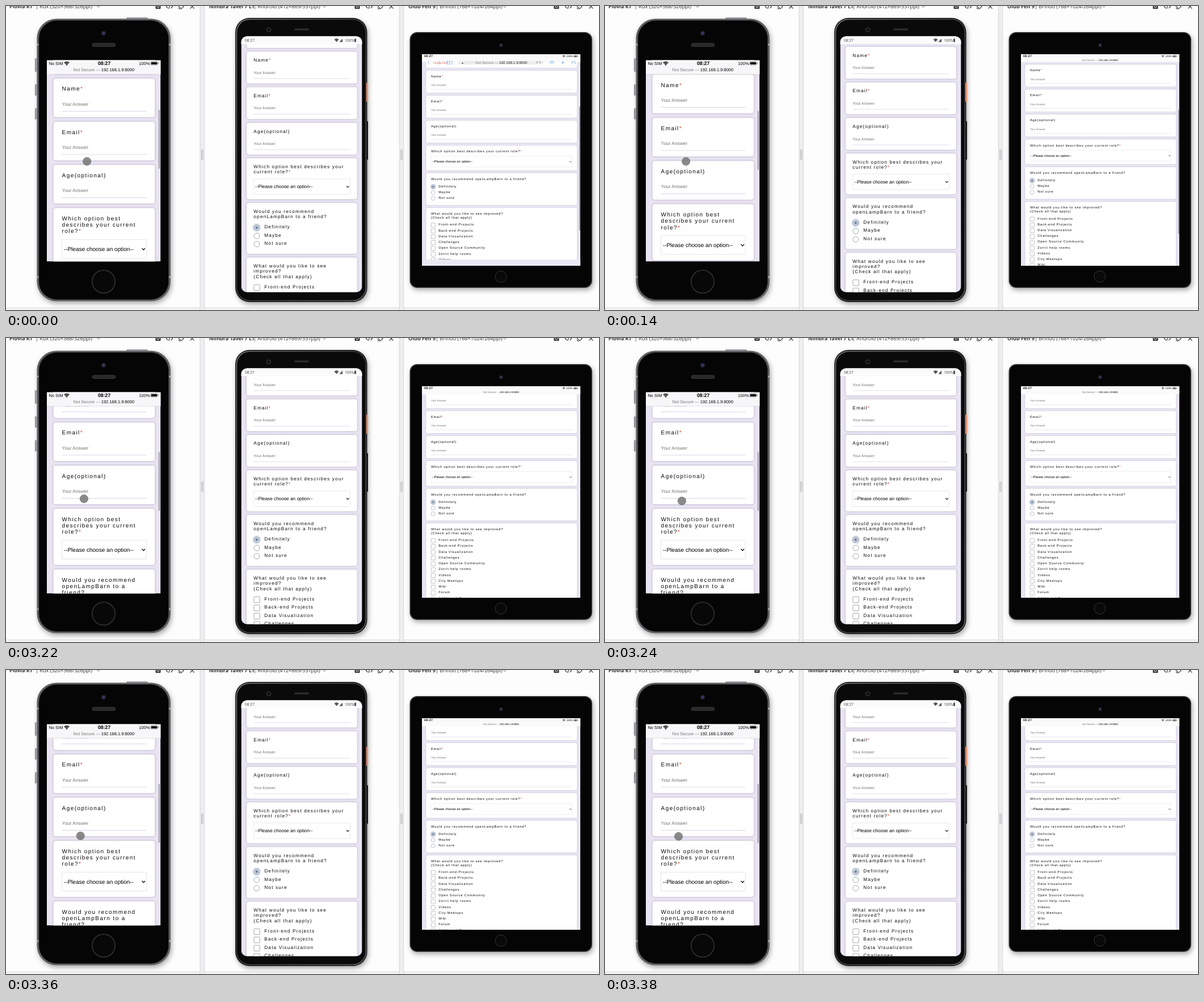
Write an HTML page that moves like this. It is 1045 px wide and 536 px high and loops after 8 s.

```html
<!DOCTYPE html>
<html lang="en">
<head>
<meta charset="utf-8">
<title>Form on three devices</title>
<style>
  html, body { margin: 0; width: 100%; height: 100%; overflow: hidden; background: #fdfdfd; }
  svg { display: block; width: 100vw; height: 100vh; font-family: "Liberation Sans", Arial, sans-serif; }
  text { white-space: pre; text-rendering: geometricPrecision; }
  .shadow { filter: drop-shadow(2px 4px 4px #0005); }
  .card { fill: #fff; stroke: #cfc9da; stroke-width: 1.3; filter: drop-shadow(0 0 2px #bdb5cc); }
  .label { font-size: 16px; letter-spacing: 2.25px; fill: #0a0a0a; }
  .hint { font-size: 13.33px; fill: #757575; }
  .line { stroke: #dcdcec; stroke-width: 1.8; }
  .box { fill: #fff; stroke: #858585; stroke-width: 1.4; }
  .ring { fill: #fff; stroke: #8795ab; stroke-width: 1.6; }
  .head { font: 9.1px "Open Sans", "Noto Sans", sans-serif; fill: #333; }
  .icon { fill: none; stroke: #444; stroke-width: 1.2; }
</style>
</head>
<body>
<svg id="stage" viewBox="0 0 1045 536" preserveAspectRatio="none"></svg>
<script>
const rect = (x, y, w, h, r, fill, more = '') =>
  `<rect x="${x}" y="${y}" width="${w}" height="${h}" rx="${r}" fill="${fill}" ${more}/>`;
const circle = (x, y, r, fill, more = '') =>
  `<circle cx="${x}" cy="${y}" r="${r}" fill="${fill}" ${more}/>`;
const path = (d, more = 'class="icon"') => `<path d="${d}" ${more}/>`;
const text = (x, y, size, str, more = '') =>
  `<text x="${x}" y="${y}" font-size="${size}" ${more}>${str}</text>`;

// Form pages are laid out in CSS pixels and scaled; y lists the scroll positions.
const devices = [
  { x: 72.5, s: .628, w: 320, y: [127.5, 120.6, 72.3], clip: [72, 95.5, 200.5, 355, 0],
    role: 'Which option best|describes your current|role?',
    rec: 'Would you recommend|openLampBarn to a|friend?',
    see: 'What would you like to|see improved?|(Check all that apply)' },
  { x: 414.9, s: .517, w: 412, y: [80.1, 71.6, 45], clip: [414.5, 53.5, 213, 451, 10],
    role: 'Which option best describes your|current role?',
    rec: 'Would you recommend|openLampBarn to a friend?',
    see: 'What would you like to see|improved?|(Check all that apply)' },
  { x: 733.8, s: .3633, w: 768, y: [113.5, 102.7, 84.3], clip: [733, 85, 279.2, 373, 0],
    role: 'Which option best describes your current role?',
    rec: 'Would you recommend openLampBarn to a friend?',
    see: 'What would you like to see improved?|(Check all that apply)' }
];
const topics = ['Front-end Projects', 'Back-end Projects', 'Data Visualization', 'Challenges',
  'Open Source Community', 'Zorrit help rooms', 'Videos', 'City Meetups', 'Wiki', 'Forum',
  'Additional Courses'];
const star = '<tspan fill="#d8432f">*</tspan>';

function form({ w, role, rec, see }) {
  const left = 41.5, right = w - left, gap = 11.2, step = 28.2;
  let y = 0, out = '';
  const card = (top, h) => rect(17, top, w - 34, h, 7, '#fff', 'class="card"');
  const title = (str, mark) => {
    const lines = str.split('|'), last = lines.length - 1;
    lines.forEach((s, i) => out +=
      text(left, y + 35 + 18 * i, 16, s + (mark && i === last ? star : ''), 'class="label"'));
  };
  const options = (list, base, mark) => list.forEach((s, i) => {
    const cy = y + base + i * step;
    out += mark(cy + 2.5, i) + text(78, cy + 5.5, 16, s, 'class="label"');
  });

  out += card(-200 - gap, 200);
  ['Name', 'Email', 'Age(optional)'].forEach((s, i) => {
    out += card(y, 110);
    title(s, i < 2);
    out += text(left, y + 76.8, 13.33, 'Your Answer', 'class="hint"') +
      path(`M${left} ${y + 92.5}H${right}`, 'class="line"');
    y += 110 + gap;
  });

  let n = 18 * role.split('|').length;
  out += card(y, n + 105);
  title(role, true);
  out += rect(left, y + n + 35, right - left, 53, 1, '#fff', 'stroke="#e4e4ee" stroke-width="1.6"') +
    text(46.5, y + n + 67, 16, '--Please choose an option--') +
    path(`M${w - 54} ${y + n + 59.5}l4.5 4.5l4.5 -4.5`, 'fill="none" stroke="#111" stroke-width="2.2"');
  y += n + 105 + gap;

  n = 18 * (rec.split('|').length - 1) + 64.5;
  out += card(y, n + 92.5);
  title(rec);
  options(['Definitely', 'Maybe', 'Not sure'], n, (cy, i) => i
    ? circle(52, cy, 9.5, '#fff', 'class="ring"')
    : circle(52, cy, 17, 'url(#glow)') +
      circle(52, cy, 9, '#c6cfdc', 'stroke="#9ca8ba" stroke-width="1.5"') + circle(52, cy, 4, '#6a7b98'));
  y += n + 92.5 + gap;

  n = 18 * (see.split('|').length - 1) + 64.2;
  out += card(y, n + topics.length * step + 10);
  title(see);
  options(topics, n, cy => rect(42.5, cy - 9.5, 20, 20, 2, '#fff', 'class="box"'));
  return out;
}

const screen = (d, i) => {
  const [x, y, w, h, r] = d.clip;
  return `<clipPath id="clip${i}">${rect(x, y, w, h, r, '#fff')}</clipPath>
    <g clip-path="url(#clip${i})">${rect(x, y, w, h, 0, '#e9e4f2')}<g id="page${i}">${form(d)}</g>`;
};

const arcs = (x, y, r, color) => circle(x, y - r * .1, r * .16, color) +
  [.45, .75, 1.05].map(k => path(`M${x - r * k * .72} ${y - r * k * .7}Q${x} ${y - r * k * 1.3} ${x + r * k * .72} ${y - r * k * .7}`,
    `fill="none" stroke="${color}" stroke-width="${r * .19}"`)).join('');
const battery = (x, y, w, h) => rect(x, y, w, h, h * .25, '#fff', 'stroke="#444" stroke-width=".6"') +
  rect(x + .9, y + .9, w - 1.8, h - 1.8, .6, '#111') + rect(x + w + .6, y + h * .3, .9, h * .4, .4, '#444');
const address = (x, y, size) => text(x, y, size,
  '<tspan fill="#777">Not Secure — </tspan>192.168.1.9:8000');

function header(x, name, x2, info, chevron, icons) {
  const [a, b, c, d] = icons;
  return text(x, 3.6, 9.1, name, 'class="head" style="font-weight:700"') +
    text(x2, 3.6, 9.1, info, 'class="head"') +
    path(`M${chevron - 2.5} 0l2.5 2.5l2.5 -2.5`, 'fill="none" stroke="#777"') +
    rect(a - 4.5, -3, 9, 8, 1, '#333') + circle(a, 1, 2, '#333', 'stroke="#fff" stroke-width=".9"') +
    path(`M${b - 2.5} -2l-3 3l3 3M${b + 2.5} -2l3 3l-3 3M${b + 1.2} -3l-2.4 8`) +
    path(`M${c - 4} 0l4 -4l5 5l-4 4zM${c - 4} 3l3 3`) +
    path(`M${d - 3.5} -2.5l7 7m0 -7l-7 7`);
}

function smallPhone() {
  const bands = [68, 478].map(y => rect(54.2, y - 1.5, 4, 3, 0, '#aaa') + rect(286.5, y - 1.5, 4, 3, 0, '#aaa'));
  const keys = [[92, 24], [138, 20], [180, 20]].map(([y, h]) => rect(51, y, 5, h, 1.5, 'url(#metal)'));
  return rect(212, 20, 38, 6, 2, '#a3a4a8') + keys.join('') +
    rect(54.5, 22.5, 235.5, 498, 34, '#5f6164', 'class="shadow"') + bands.join('') +
    rect(58, 25.5, 228.5, 492, 31.5, '#050505', 'stroke="#2c2d2f" stroke-width="1"') +
    circle(172, 48, 4.3, '#20222b') + circle(172, 48, 2, '#3b3f72') +
    rect(152, 65.8, 41, 5.6, 2.8, '#292929', 'stroke="#454545" stroke-width=".7"') +
    circle(172, 486, 20.3, '#080808', 'stroke="#343434" stroke-width="1.5"') +
    screen(devices[0], 0) +
    rect(72, 95.5, 201, 24.7, 0, '#f7f7f9') + path('M72 120.3H273', 'stroke="#d0cdd6" stroke-width=".6"') +
    text(75.4, 104, 7.5, 'No SIM') + arcs(107, 104.6, 6, '#111') +
    text(161.9, 104.4, 8.8, '08:27', 'font-weight="700"') + text(234.4, 104, 7.5, '100%') +
    battery(255, 98, 12, 6) + address(118.6, 115, 7.5) +
    rect(268.8, 0, 2.2, 104, 1.1, '#a5a0ae', 'id="bar0"') + '</g>';
}

function tallPhone() {
  return rect(404, 21, 232.5, 501, 25, '#1b1c1d', 'class="shadow"') +
    rect(406.4, 23.4, 227.7, 496.2, 23, '#0a0a0a', 'stroke="url(#rim)" stroke-width="1.5"') +
    rect(635, 135, 3, 34, 1, '#e58a6c') + rect(635, 203, 3, 68, 1, '#181818') +
    circle(463, 42, 4.5, '#252628') + circle(463, 42, 2.2, '#0b0b0c') +
    rect(508, 39.5, 26, 3.6, 1.8, '#2b2b2b') +
    screen(devices[1], 1) +
    rect(414, 53, 214, 14.2, 0, '#fbfbfc') +
    `<g fill="#555" font-family="Roboto, sans-serif">` + text(421, 63, 6.8, '08:27') + text(597, 63, 6.8, '100%') +
    path('M582.5 63.6l-4 -4.7q4 -3.4 8 0zM593 57.5v6h-5.5zM613.8 58h.9v-.8h1.4v.8h.9v5.6h-3.2z', '') + '</g></g>';
}

function tablet() {
  const blue = 'fill="none" stroke="#6aa5ea" stroke-width=".9"';
  const toolbar = `<g id="toolbar"><clipPath id="fold">${rect(733, 97, 280, 6, 0, '#fff')}</clipPath>
    <g clip-path="url(#fold)" opacity=".85">` +
    text(753, 102, 6, 'required', 'fill="#d8432f" letter-spacing=".5"') +
    rect(797, 89, 150, 14, 2, '#e9e9ec') + text(803, 102, 6, '▴', 'fill="#333"') + address(827, 102, 6.4) +
    path('M747 96l-4 4l4 4M761 96l4 4l-4 4M777 97h9v6h-9zM781.5 97v6M959 98h6v6h-6zM962 102v-6M978 100h6M981 97v6M997 98h6v6h-6z', blue) +
    path('M936 101a3 3 0 1 1 5 0', 'fill="none" stroke="#555" stroke-width=".8"') + '</g>' +
    rect(733, 447, 280, 12, 0, '#ebe7f3') + '</g>';
  return rect(711.5, 46, 321.5, 451, 13, '#3a3b3d', 'class="shadow"') +
    rect(713, 47.5, 318.5, 448, 12, '#050505') +
    circle(872.5, 69, 3.2, '#22242e') + circle(872.5, 69, 1.5, '#3b3f6a') +
    circle(872, 477, 10, '#090909', 'stroke="#343434"') +
    screen(devices[2], 2) +
    rect(733, 85, 280, 14, 0, '#fafafb') +
    text(737, 90, 5.2, '08:27', 'font-weight="700" letter-spacing=".4"') +
    arcs(983, 90.4, 3.2, '#111') + text(987.5, 90.2, 4.4, '100%') + battery(1000.5, 87, 6, 3.2) +
    `<g id="compact">${address(841, 96.8, 4.4)}</g>` + toolbar +
    rect(1010.3, 0, 1.2, 219, .6, '#77727f', 'id="bar2"') + '</g>';
}

const divider = x => rect(x, 0, 7.5, 536, 0, '#eeeef0') +
  path(`M${x} 0V536M${x + 7.5} 0V536`, 'stroke="#cfcfd2" stroke-width=".8"') +
  path(`M${x + 2.6} 253v18m2.3 0v-18`, 'stroke="#a9a9ad" stroke-width=".9"');

document.getElementById('stage').innerHTML = `<defs>
  <linearGradient id="rim" x2="1" y2="1"><stop stop-color="#77797c"/><stop offset=".5" stop-color="#3a3b3d"/><stop offset="1" stop-color="#606265"/></linearGradient>
  <linearGradient id="metal"><stop stop-color="#77797d"/><stop offset=".5" stop-color="#c4c5c8"/><stop offset="1" stop-color="#77797d"/></linearGradient>
  <radialGradient id="glow"><stop offset=".45" stop-color="#a3b1c8"/><stop offset="1" stop-color="#d0d8e5" stop-opacity="0"/></radialGradient>
  </defs>` +
  rect(0, 0, 1045, 536, 0, '#fdfdfd') + rect(0, 532, 1045, 4, 0, '#f6f6f7') +
  path('M0 532.3H1045', 'stroke="#d3d3d6"') + divider(342) + divider(693.3) +
  header(6, 'Plovia KT', 52, '| Rux (320×568/326ppi)', 163, [268, 288, 308, 328]) +
  header(358, 'Nimbra Tavel 7 LT', 436, '| Android (412×869/537ppi)', 561, [619, 640, 659, 679]) +
  header(709, 'Olub Fen 9', 757, '| Brindo (768×1024/264ppi)', 879, [970, 991, 1010, 1031]) +
  smallPhone() + tallPhone() + tablet() +
  circle(0, 0, 7.1, '#707070', 'id="pointer" fill-opacity=".82" stroke="#777" stroke-width=".8"');

const $ = id => document.getElementById(id);
const moves = [[0, 142.7, 274], [3220, 137.5, 283.5], [3240, 135.5, 287.3],
  [3340, 133, 291], [3360, 131.2, 292.4], [3380, 129.6, 293.4]];

function draw(now) {
  const t = now % 8000, k = t < 140 ? 0 : t < 2500 ? 1 : 2;
  devices.forEach((d, i) =>
    $('page' + i).setAttribute('transform', `translate(${d.x} ${d.y[k]}) scale(${d.s})`));
  $('bar0').setAttribute('y', [183, 185, 201][k]);
  $('bar2').setAttribute('y', k ? 183 : 177);
  $('bar2').style.display = k < 2 ? '' : 'none';
  $('toolbar').style.display = k ? 'none' : '';
  $('compact').style.display = k ? '' : 'none';
  const [, x, y] = moves.filter(m => m[0] <= t).pop();
  $('pointer').setAttribute('transform', `translate(${x} ${y})`);
}

const start = performance.now();
function tick() {
  draw(performance.now() - start);
  requestAnimationFrame(tick);
}
tick();
</script>
</body>
</html>
```
